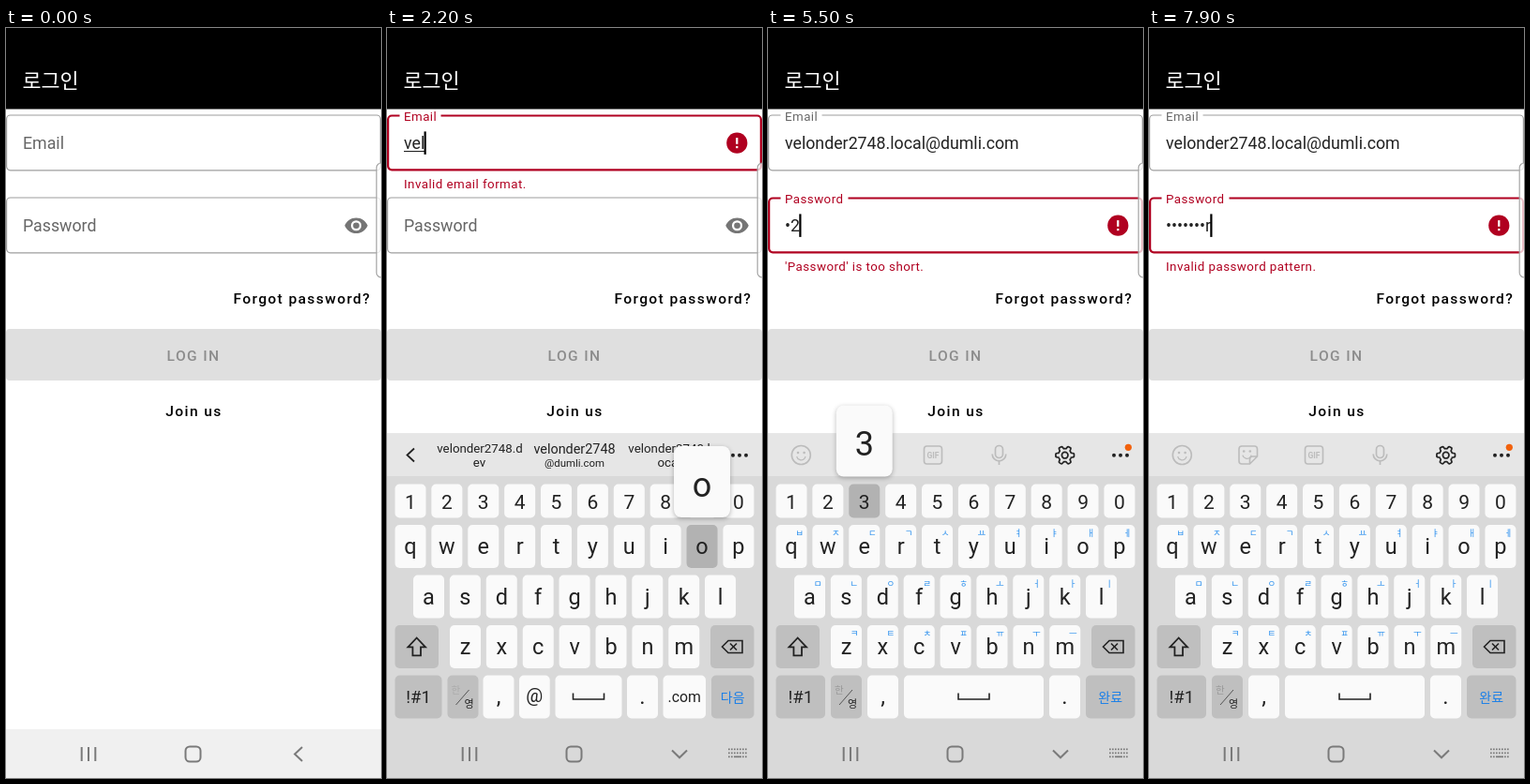
An HTML page with a canvas for the animation above (8000 ms loop, 400 by 800 pixels).

```html
<!DOCTYPE html>
<html lang="ko">
<head>
<meta charset="utf-8">
<title>Login form</title>
<style>
  html, body { margin: 0; width: 100%; height: 100%; overflow: hidden; background: #fff; }
  canvas { display: block; width: 400px; height: 800px; }
</style>
</head>
<body>
<canvas id="stage"></canvas>
<script>
const LOOP = 8000, STEP = 100;
const canvas = document.getElementById('stage');
const c = canvas.getContext('2d');
const dpr = window.devicePixelRatio || 1;
canvas.width = 400 * dpr;
canvas.height = 800 * dpr;

const SANS = 'Roboto, sans-serif';
const HANGUL = '"Noto Sans CJK KR", "Noto Sans CJK", sans-serif';
const RED = '#b00020', BLUE = '#1a7fe8', INK = '#222', DIM = '#bcbcbc';
const KEY = '#fafafa', FN = '#bfbfbf', DOWN = '#b2b2b2', PANEL = '#d9d9d9';
const BODY = 17.78, SMALL = 13.33;

const FOCUS_EMAIL = 600, FILL = 3600, FOCUS_PASS = 4300, SHIFT = 6300;
const USER = 'velonder2748', ADDRESS = USER + '.local@dumli.com';
const emailKeys = [[1500, 'v'], [1800, 'e'], [2000, 'l'], [2200, 'o']];
const passKeys = [[4800, '1'], [5100, '2'], [5500, '3'], [5800, '4'],
  [6700, 'Q'], [7000, 'w'], [7300, 'e'], [7700, 'r']];
const actions = [FOCUS_EMAIL, FILL, FOCUS_PASS,
  ...emailKeys.concat(passKeys).map(k => k[0] + 100)].sort((a, b) => a - b);

const EYE = new Path2D('M12 4.5C7 4.5 2.73 7.61 1 12c1.73 4.39 6 7.5 11 7.5s9.27-3.11 11-7.5' +
  'c-1.73-4.39-6-7.5-11-7.5zM12 17a5 5 0 1 1 0-10 5 5 0 0 1 0 10zM12 9a3 3 0 1 0 0 6 3 3 0 0 0 0-6z');

const clamp = (v, lo = 0, hi = 1) => Math.min(hi, Math.max(lo, v));
const ramp = (t, from, ms) => { const p = clamp((t - from) / ms); return p * p * (3 - 2 * p); };
const mix = (a, b, p) => a + (b - a) * p;

function text(s, x, y, size, color, o = {}) {
  c.font = `${o.weight || 400} ${size}px ${o.font || SANS}`;
  c.letterSpacing = (o.spacing || 0) + 'px';
  c.textAlign = o.align || 'left';
  c.textBaseline = o.base || 'alphabetic';
  c.fillStyle = color;
  c.fillText(s, x, y);
  return c.measureText(s).width;
}
const mid = (s, x, y, size, color, o) => text(s, x, y, size, color, { align: 'center', ...o });
const rect = (x, y, w, h, color) => { c.fillStyle = color; c.fillRect(x, y, w, h); };

function round(x, y, w, h, r, fill, stroke, width) {
  c.beginPath();
  c.roundRect(x, y, w, h, r);
  if (fill) { c.fillStyle = fill; c.fill(); }
  if (stroke) { c.strokeStyle = stroke; c.lineWidth = width; c.stroke(); }
}
function line(points, color, width, close) {
  c.beginPath();
  for (let i = 0; i < points.length; i += 2) c.lineTo(points[i], points[i + 1]);
  if (close) c.closePath();
  c.strokeStyle = color;
  c.lineWidth = width;
  c.stroke();
}
function dot(x, y, r, color) {
  c.beginPath();
  c.arc(x, y, r, 0, 7);
  c.fillStyle = color;
  c.fill();
}
function arc(x, y, r, from, to, color, width) {
  c.beginPath();
  c.arc(x, y, r, from, to);
  c.strokeStyle = color;
  c.lineWidth = width;
  c.stroke();
}

function eye(y) {
  c.save();
  c.translate(360.2, y - 13.3);
  c.scale(1.111, 1.111);
  c.fillStyle = '#757575';
  c.fill(EYE, 'evenodd');
  c.restore();
}
function alertIcon(y) {
  dot(373.3, y, 11.1, RED);
  rect(372.2, y - 5.6, 2.2, 6.7, '#fff');
  rect(372.2, y + 3.3, 2.2, 2.2, '#fff');
}

// f: y, label, labelWidth, up (0..1), focused, error, value, composing, caret, eye
function field(f) {
  const y = f.y, strong = f.focused || f.error;
  const tone = f.error ? RED : f.focused ? '#000' : '#666';
  const lw = strong ? 2.2 : 1.2;
  round(lw / 2, y + lw / 2, 400 - lw, 60 - lw, 4, null, strong ? tone : '#9e9e9e', lw);
  if (f.up > 0) {
    const half = (f.labelWidth / 2 + 4.5) * f.up;
    rect(18 + f.labelWidth / 2 - half, y - 2, half * 2, 6, '#fff');
  }
  text(f.label, 18, y + mix(36.4, 6.3, f.up), mix(BODY, SMALL, f.up), tone, { spacing: 0.45 * f.up });
  const w = f.value ? text(f.value, 18, y + 36.8, BODY, INK) : 0;
  if (f.composing) rect(18, y + 38.6, w, 1.1, INK);
  if (f.caret) rect(18 + w - (w ? 0.7 : 0), y + 18, 2.2, 24.5, '#000');
  if (f.error) alertIcon(y + 30.3);
  else if (f.eye) eye(y + 30.3);
}
function message(s, y, p) {
  c.globalAlpha = p;
  text(s, 18, y - 5 * (1 - p), SMALL, RED, { spacing: 0.45 });
  c.globalAlpha = 1;
}

function form(t) {
  const typed = keys => keys.filter(k => t >= k[0] + 100).map(k => k[1]);
  const last = actions.filter(a => a <= t).pop();
  const blink = last !== undefined && (t - last) % 1000 < 500;
  const onPass = t >= FOCUS_PASS, onEmail = t >= FOCUS_EMAIL && !onPass;

  rect(0, 0, 400, 800, '#fff');
  rect(0, 0, 400, 86.5, '#000');
  text('로그인', 17.5, 64, 21.8, '#fff', { font: HANGUL });

  const bad = t >= 1600 && t < FILL;
  field({
    y: 92.4, label: 'Email', labelWidth: 35, up: ramp(t, FOCUS_EMAIL - 60, 180),
    focused: onEmail, error: bad, value: t >= FILL ? ADDRESS : typed(emailKeys).join(''),
    composing: bad, caret: onEmail && blink
  });
  const emailNote = ramp(t, 1500, 250) - ramp(t, FILL - 50, 200);
  if (emailNote > 0) message('Invalid email format.', 171, emailNote);

  const secret = typed(passKeys), n = secret.length;
  field({
    y: 180.4, label: 'Password', labelWidth: 63, up: ramp(t, FOCUS_PASS - 70, 180),
    focused: onPass, error: n > 0, value: n ? '•'.repeat(n - 1) + secret[n - 1] : '',
    caret: onPass && blink, eye: true
  });
  if (n) message(n < 8 ? "'Password' is too short." : 'Invalid password pattern.', 259, ramp(t, 4800, 250));

  const btn = { weight: 500, spacing: 1.39 };
  text('Forgot password?', 242.4, 294.3, 15.56, '#000', btn);
  round(0, 321, 400, 55, 4, '#dfdfdf');
  text('LOG IN', 171.6, 354.5, 15.56, '#8c8c8c', btn);
  text('Join us', 170.3, 414.3, 15.56, '#000', btn);
  round(395.2, 144, 12, 122, 5, 'rgba(255,255,255,.75)', '#a6a6a6', 1.2);
}

function smile(x, y, color) {
  dot(x - 3.3, y - 2.5, 1.3, color);
  dot(x + 3.3, y - 2.5, 1.3, color);
  arc(x, y + 0.5, 4.8, 0.25, Math.PI - 0.25, color, 1.4);
}
function gear(x, y) {
  c.beginPath();
  for (let i = 0; i <= 120; i++) {
    const a = i / 120 * Math.PI * 2;
    const r = 8.4 + 1.4 * clamp(2.2 * Math.cos(6 * a + Math.PI), -1, 1);
    c.lineTo(x + r * Math.sin(a), y - r * Math.cos(a));
  }
  c.closePath();
  c.strokeStyle = INK;
  c.lineWidth = 1.7;
  c.stroke();
  arc(x, y, 3.3, 0, 7, INK, 1.7);
}
function tools(pass) {
  arc(35.3, 455.5, 10, 0, 7, DIM, 1.6);
  smile(35.3, 455.5, DIM);
  c.beginPath();
  c.moveTo(115.5, 457);
  c.lineTo(115.5, 449);
  c.arcTo(115.5, 446, 112, 446, 3);
  c.arcTo(96, 446, 96, 450, 3);
  c.arcTo(96, 465, 100, 465, 3);
  c.lineTo(107.5, 465);
  c.closePath();
  c.moveTo(107.5, 465);
  c.lineTo(107.5, 460);
  c.arcTo(107.5, 457, 111, 457, 3);
  c.lineTo(115.5, 457);
  c.strokeStyle = DIM;
  c.lineWidth = 1.6;
  c.stroke();
  smile(104.5, 454, DIM);
  round(166.5, 446, 19, 19, 3, null, DIM, 1.6);
  mid('GIF', 176, 458.8, 8.5, DIM, { weight: 700 });
  const mic = pass ? DIM : INK;
  round(242.5, 445.5, 8, 13, 4, null, mic, 1.7);
  arc(246.5, 454.5, 7.3, 0, Math.PI, mic, 1.7);
  line([246.5, 462, 246.5, 466], mic, 1.7);
  gear(316.7, 455.7);
}
function suggestions() {
  line([29, 448.5, 21.5, 455.5, 29, 462.5], INK, 1.8);
  mid(USER + '.d', 99, 452.5, 13.3, INK);
  mid('ev', 98.5, 468, 13.3, INK);
  mid(USER, 200, 454, 14.4, INK);
  mid('@dumli.com', 200, 468, 11.4, INK);
  mid(USER + '.l', 301, 452.5, 13.3, INK);
  mid('ocal', 301, 468, 13.3, INK);
}

const STEP_X = 38.88;
const rows = [
  { keys: '1234567890', x: 8.5, y: 486.5, h: 36, size: 21, base: 26 },
  { keys: 'qwertyuiop', hints: 'ㅂㅈㄷㄱㅅㅛㅕㅑㅐㅔ', x: 8.5, y: 530 },
  { keys: 'asdfghjkl', hints: 'ㅁㄴㅇㄹㅎㅗㅓㅏㅣ', x: 28, y: 583.5 },
  { keys: 'zxcvbnm', hints: 'ㅋㅌㅊㅍㅠㅜㅡ', x: 67, y: 637 }
];

function letterKeys(pass, upper, pressed) {
  let popup = null;
  for (const { keys, hints, x, y, h = 46, size = 23.5, base = 31 } of rows) {
    [...keys].forEach((k, i) => {
      const kx = x + i * STEP_X, hit = pressed && pressed.toLowerCase() === k;
      round(kx, y, 33, h, 5, hit ? DOWN : KEY);
      mid(upper ? k.toUpperCase() : k, kx + 16.5, y + base, size, INK);
      if (pass && hints) mid(hints[i], kx + 25, y + 12, 9.5, '#2c90ee', { font: HANGUL });
      if (hit) popup = { x: kx + 16.5, y: y - 84 };
    });
  }
  return popup;
}

function bottomRow(pass) {
  const y = 690.5, h = 46;
  const key = (x, right, fill) => {
    round(x, y, right - x, h, 5, fill);
    return (x + right) / 2;
  };
  const edge = pass ? 61 : 58.5, lang = pass ? 67 : 64.5;
  mid('!#1', key(8.5, edge, FN), 720, 18.5, INK);
  key(lang, lang + 33, FN);
  text('한', lang + 4, 710, 10.5, pass ? '#999' : '#aaa', { font: HANGUL });
  line([lang + 9, 722, lang + 23, 706], '#555', 1);
  text('영', lang + 18, 725, 11, INK, { font: HANGUL });
  const comma = pass ? 106 : 102.5;
  mid(',', key(comma, comma + 33, KEY), 721, 24, INK);
  if (!pass) mid('@', key(141, 173.7, KEY), 719, 20, INK);
  const s = pass ? key(145, 294, KEY) : key(179.5, 250.5, KEY);
  line([s - 16.5, 709.5, s - 16.5, 716, s + 16.5, 716, s + 16.5, 709.5], INK, 1.6);
  const stop = pass ? 300 : 256;
  mid('.', key(stop, stop + 33, KEY), 721, 24, INK);
  if (!pass) mid('.com', key(294.5, 340, KEY), 719, 15.8, INK);
  mid(pass ? '완료' : '다음', key(pass ? 339 : 346, 391.5, FN), 718.5, 14, BLUE, { font: HANGUL, weight: 500 });
}

function keyboard(t) {
  const pass = t >= FOCUS_PASS;
  const upper = t >= SHIFT && t < 6800;
  const down = emailKeys.concat(passKeys).find(k => t >= k[0] && t < k[0] + 100);
  const suggest = t >= 1700 && t < FILL;

  rect(0, 432.5, 400, 368, PANEL);
  rect(0, 432.5, 400, 45.5, '#e6e6e6');
  if (suggest) suggestions();
  else tools(pass);
  [369, 376, 383].forEach(x => dot(x, 455.8, 2, INK));
  if (!suggest) dot(384.3, 447.3, 3.6, '#f2620d');

  const popup = letterKeys(pass, upper, down && down[1]);
  round(8.5, 637, 46.5, 46, 5, FN);
  line([31.7, 650.5, 41, 660.3, 36, 660.3, 36, 669.3, 27.4, 669.3, 27.4, 660.3, 22.4, 660.3],
    upper ? BLUE : INK, 1.8, true);
  round(345, 637, 46.5, 46, 5, FN);
  line([357.5, 660, 364, 653.5, 379, 653.5, 379, 666.5, 364, 666.5], INK, 1.6, true);
  line([366, 656.5, 373, 663.5], INK, 1.6);
  line([373, 656.5, 366, 663.5], INK, 1.6);
  bottomRow(pass);

  if (popup) {
    const x = clamp(popup.x - 30, 4, 336);
    c.save();
    c.shadowColor = 'rgba(0,0,0,.28)';
    c.shadowBlur = 5 * dpr;
    c.shadowOffsetY = 1.5 * dpr;
    round(x, popup.y, 60, 76, 8, KEY);
    c.restore();
    mid(down[1], x + 30, popup.y + 53.5, 36, INK);
  }
}

function navBar(open) {
  const g = Math.round(mix(240, 217, open)), ink = '#7a7a7a';
  rect(0, 748, 400, 52, `rgb(${g},${g},${g})`);
  [80.7, 88, 95.3].forEach(x => line([x, 767, x, 782], ink, 2));
  round(191.5, 766.5, 16, 16, 4.5, null, ink, 2);
  if (open < 0.5) {
    line([316, 767, 308, 774.5, 316, 782], ink, 2);
    return;
  }
  line([304, 770.5, 312, 778.3, 320, 770.5], ink, 2);
  for (let i = 0; i < 7; i++) {
    rect(364 + i * 3, 768.5, 1.7, 1.7, ink);
    rect(364 + i * 3, 772.5, 1.7, 1.7, ink);
    if (i < 2 || i > 4) rect(364 + i * 3, 776.5, 1.7, 1.7, ink);
  }
  rect(370, 776.5, 8, 1.7, ink);
}

function draw(now) {
  const t = Math.floor((now % LOOP) / STEP) * STEP;
  const open = 1 - (1 - clamp((t - 500) / 400)) ** 3;
  c.setTransform(dpr, 0, 0, dpr, 0, 0);
  form(t);
  if (open > 0) {
    c.save();
    c.translate(0, (1 - open) * 367);
    keyboard(t);
    c.restore();
  }
  navBar(open);
}

const start = performance.now();
function tick() {
  draw(performance.now() - start);
  requestAnimationFrame(tick);
}
tick();
</script>
</body>
</html>
```
